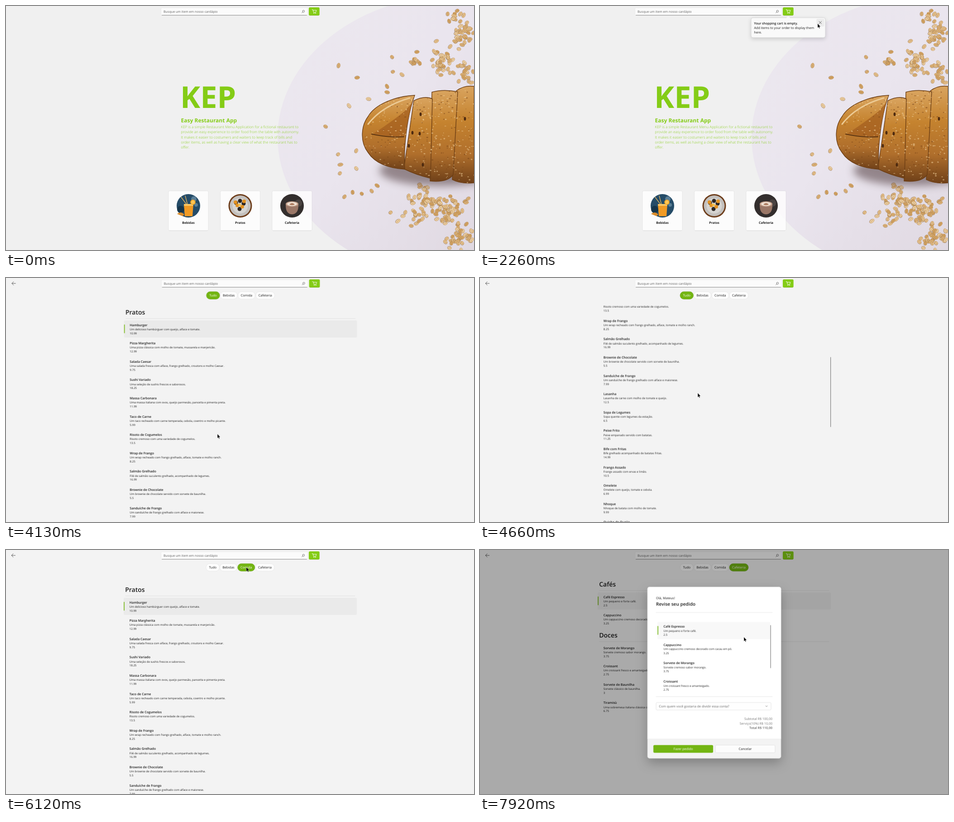
Recreate the animation shown at these times as an HTML page. Size 1034 px wide and 541 px high, loop 7.99 s.

```html
<!DOCTYPE html>
<html lang="pt">
<head>
<meta charset="utf-8">
<title>Menu</title>
<style>
  html, body { margin: 0; width: 100%; height: 100%; overflow: hidden; background: #f0f0f0; }
  svg { display: block; width: 1034px; height: 541px; }
  text { font-family: "Open Sans", "Noto Sans", sans-serif; font-size: 7.14px; fill: #1b1b1b; text-rendering: geometricPrecision; white-space: pre; }
  .name { font-weight: 600; font-size: 7.05px; }
  .small { font-size: 6.1px; }
  .head { font-weight: 600; font-size: 14px; }
  .brand { font-weight: 700; font-size: 66.5px; fill: #84cc16; }
  .title { font-weight: 700; font-size: 12.04px; fill: #84cc16; }
  .para { font-weight: 300; font-size: 8.11px; fill: #84cc16; }
  .label { font-weight: 700; font-size: 6.95px; }
  .mid { text-anchor: middle; }
  .end { text-anchor: end; }
  .line { fill: none; stroke-linecap: round; stroke-linejoin: round; }
  #tip { transform-origin: 681px 23px; }
  #dialog { transform-origin: 517px 272px; }
</style>
</head>
<body>
<svg id="stage" viewBox="0 0 1034 541"></svg>
<script>
const DUR = 7990, GREEN = '#84cc16', DEEP = '#73b512';
const EASE = 'cubic-bezier(.1,.9,.2,1)', PITCH = 40.6;

// Drawing helpers
const text = (x, y, s, cls = '', fill = '') =>
  `<text x="${x}" y="${y}" class="${cls}"${fill && ` style="fill:${fill}"`}>${s}</text>`;
const rect = (x, y, w, h, fill, r = 0, more = '') =>
  `<rect x="${x}" y="${y}" width="${w}" height="${h}" rx="${r}" fill="${fill}" ${more}/>`;
const circle = (x, y, r, fill, more = '') => `<circle cx="${x}" cy="${y}" r="${r}" fill="${fill}" ${more}/>`;
const path = (d, fill, more = '') => `<path d="${d}" fill="${fill}" ${more}/>`;
const stroke = (d, color, w = .8) => `<path class="line" d="${d}" stroke="${color}" stroke-width="${w}"/>`;
const group = (id, body, more = '') => `<g id="${id}" ${more}>${body}</g>`;

let seed = 7;
const rand = () => {
  seed = (seed * 1664525 + 1013904223) % 4294967296;
  return seed / 4294967296;
};
const spread = () => rand() + rand() + rand() - 1.5;

// Timeline helpers: stops are [ms, declarations, easing to the next stop]
let css = '';
const tracks = {};
function anim(id, stops) {
  const list = tracks[id] = tracks[id] || [];
  const name = `${id}-${list.length}`;
  const all = [[0, stops[0][1]], ...stops, [DUR, stops[stops.length - 1][1]]];
  css += `@keyframes ${name}{` + all.map(([ms, decl, ease]) =>
    `${(ms / DUR * 100).toFixed(3)}%{${decl};animation-timing-function:${ease || 'linear'}}`).join('') + '}';
  list.push(`${name} ${DUR}ms linear infinite`);
}
function show(id, from, to = DUR, fadeIn = 1, fadeOut = 1) {
  const stops = from > 0 ? [[from, 'opacity:0'], [from + fadeIn, 'opacity:1']] : [[0, 'opacity:1']];
  if (to < DUR) stops.push([to, 'opacity:1'], [to + fadeOut, 'opacity:0']);
  anim(id, stops);
}
const move = (id, points) =>
  anim(id, points.map(([ms, x, y, ease]) => [ms, `transform:translate(${x}px,${y}px)`, ease]));
const zoom = (id, points) => anim(id, points.map(([ms, k, ease]) => [ms, `transform:scale(${k})`, ease]));

// Top bar
const HINT = 'Busque um item em nosso cardápio';
const lens = color => circle(657.3, 11.6, 2.2, 'none', `stroke="${color}" stroke-width=".8"`) +
  stroke('M655.7 13.3l-2 2', color);
const cartIcon = stroke('M676.2 8h1.7l1.7 6h4.9l1.3-4.6h-7.3', '#fff', .9) +
  circle(680.4, 16, .9, '#fff') + circle(684, 16, .9, '#fff');
const topBar = rect(342.5, 4, 324, 16.8, '#fbfbfb', 2.5, 'stroke="#e3e3e3" stroke-width=".5"') +
  stroke('M344.5 20.4H664.5', '#808080', .9) + text(348, 14.6, HINT, '', '#606060') + lens('#555') +
  rect(669, 3, 23.7, 18, GREEN, 2.5) + stroke('M671 20.7H690.5', '#6a9f1c', .6) + cartIcon;
const focusBar = rect(342.5, 4, 324, 16.8, '#fff', 2.5, 'stroke="#e3e3e3" stroke-width=".5"') +
  stroke('M344 20.1H665', DEEP, 1.3) + text(348, 14.6, HINT, '', '#8c8c8c') + lens('#666') +
  stroke('M348.4 7.3V16.6', '#222', .7);

// Loaf and oat flakes
const FLAKES = ['#e6c492', '#dcb47c', '#edd2a8', '#d3a566'];
function flake(x, y) {
  const a = rand() * 180, r = 4 + rand() * 2;
  const at = `transform="translate(${x.toFixed(1)} ${y.toFixed(1)}) rotate(${a.toFixed(0)})"`;
  return `<g ${at}><ellipse cx=".8" cy="1.2" rx="${r.toFixed(1)}" ry="3.6" fill="#97816f" opacity=".4"/>` +
    `<ellipse rx="${r.toFixed(1)}" ry="3.4" fill="${FLAKES[rand() * 4 | 0]}" stroke="#b88545" stroke-width=".6"/>` +
    stroke('M-3 0Q0 1 3 -.3', '#a97638', .6) + '</g>';
}
const heaps = [
  [1010, 55, 24, 42, 36], [965, 125, 26, 24, 34], [1012, 146, 22, 20, 22], [905, 123, 14, 10, 9], [990, 24, 12, 12, 7],
  [925, 425, 34, 30, 34], [978, 452, 38, 34, 62], [1000, 512, 34, 26, 38], [905, 475, 34, 30, 14]
];
const loose = [
  [735, 132], [776, 159], [801, 206], [706, 267], [734, 329], [774, 321], [739, 352], [774, 360], [738, 371],
  [786, 416], [766, 413], [748, 423], [853, 113], [855, 146], [875, 152], [842, 178], [908, 102], [951, 78],
  [808, 410], [850, 458], [866, 477], [758, 221], [820, 398], [842, 191]
];
const scatter = heaps.map(([x, y, w, h, n]) =>
  Array.from({ length: n }, () => flake(x + spread() * w, y + spread() * h)).join('')).join('') +
  loose.map(([x, y]) => flake(x, y)).join('');

const slices = [
  'M995 188Q1012 175 1034 178V392Q1005 395 986 385Z',
  'M941 191Q965 184 998 190L988 374Q975 392 937 388Z',
  'M901 210Q925 198 942 206L938 382Q905 374 879 361Z',
  'M903 198C860 200 815 218 800 245C785 265 781 300 800 325C815 348 845 360 881 362C878 310 887 240 903 198Z'
];
const crumbs = Array.from({ length: 520 }, () => {
  const x = 785 + rand() * 250, y = 180 + rand() * 212, dark = rand() < .35;
  return `<ellipse cx="${x.toFixed(1)}" cy="${y.toFixed(1)}" rx="${(.7 + rand() * 1.7).toFixed(1)}" ry="${(.6 + rand()).toFixed(1)}" ` +
    `fill="${dark ? '#744116' : '#f0cf9c'}" opacity="${dark ? .5 : .55}"/>`;
}).join('');
const loaf = `<ellipse cx="960" cy="365" rx="135" ry="34" fill="#4f3a3c" opacity=".55" filter="url(#soft)"/>` +
  slices.map(d => path(d, 'url(#crust)', 'stroke="#6b3d14" stroke-width="1.4"')).join('') +
  path('M812 283Q850 258 880 234L897 215Q886 265 880 290Q845 290 812 283Z', '#a55f1f', 'opacity=".75"') +
  stroke('M808 284Q845 292 879 290', '#5a3210', 2) + stroke('M800 262Q830 222 892 204', '#ecca94', 3) +
  `<g clip-path="url(#bread)">${crumbs}</g>` +
  [[916, 240], [898, 281], [914, 283], [890, 310], [921, 352], [1014, 250]].map(([x, y]) =>
    `<ellipse cx="${x}" cy="${y}" rx="2.4" ry="4" fill="#4d2a10"/>`).join('');
const photo = `<g clip-path="url(#oval)">${rect(590, 0, 444, 541, 'url(#cloth)')}${scatter}${loaf}</g>`;

// Category cards
const juice = circle(403, 443, 26, '#254c68') + circle(415, 428, 6, '#7fa0b5', 'opacity=".6"') +
  circle(420, 441, 4, '#8db0c2', 'opacity=".5"') + circle(386, 451, 8, '#16354a') +
  stroke('M387 424L399 440M396 421L401 440', '#e9b65c', 1.3) +
  path('M393 439H414L412 466H395Z', '#f09a24') + rect(393, 439, 21, 4, '#f9c766', 1.5) +
  circle(413, 435, 5.8, '#f6a51f') + circle(413, 435, 4, '#ffc557') +
  path('M378 461Q386 454 394 462L390 466Z', '#d98b2a');
const plate = circle(517.5, 443, 26, '#6d3d1b') + circle(517.5, 443, 23, '#c3c0bd') + circle(517.5, 443, 17, '#d6d4d1') +
  [[508, 436], [525, 438], [516, 450], [517, 432]].map(([x, y]) => circle(x, y, 4.5, '#2b2522')).join('') +
  [[511, 442], [522, 445], [526, 433], [507, 435]].map(([x, y]) => circle(x, y, 4, '#e39222')).join('') +
  circle(516, 441, 3, '#f3c04e');
const coffee = circle(632, 443, 26, '#332e2d') + circle(646, 437, 8, '#4a4341') +
  path('M618 439H646Q647 461 632 462Q617 461 618 439Z', '#9a7767') +
  `<ellipse cx="632" cy="439" rx="14" ry="6" fill="#c4a08b"/><ellipse cx="632" cy="439" rx="11" ry="4.2" fill="#efe0d2"/>` +
  path('M626 440Q632 434 638 440Q632 443 626 440Z', '#a9765a');
const card = (x, pic, label) =>
  rect(x - 44, 410, 88, 88, '#fff', 2.5, 'fill-opacity=".78" stroke="#000" stroke-opacity=".09" stroke-width=".7"') +
  stroke(`M${x - 42} 498H${x + 42}`, '#d4d4d4', .6) + pic + text(x, 482.5, label, 'label mid');

const intro = [
  'KEP is a simple Restaurant Menu Application for a fictional restaurant to',
  'provide an easy experience to order food from the table with autonomy.',
  'It makes it easier to costumers and waiters to keep track of bills and',
  'order items, as well as having a clear view of what the restaurant has to',
  'offer.'
];
const home = photo + topBar + group('focus', focusBar) + text(385, 226, 'KEP', 'brand') +
  text(386.5, 257.6, 'Easy Restaurant App', 'title') +
  intro.map((s, i) => text(386.5, 270.6 + i * 11.45, s, 'para')).join('') +
  card(403, juice, 'Bebidas') + card(517.5, plate, 'Pratos') + card(632, coffee, 'Cafeteria');

const tip = rect(599, 26, 164, 44, '#f9f9f9', 4, 'stroke="#c9c9c9" stroke-width=".7" filter="url(#drop)"') +
  path('M676 26.4L681 22L686 26.4Z', '#f9f9f9', 'stroke="#d5d5d5" stroke-width=".4"') +
  rect(677, 26, 8, 1.2, '#f9f9f9') + group('close', rect(743.5, 28.5, 17, 17, '#ececec', 2)) +
  stroke('M749 34L754.6 39.4M754.6 34L749 39.4', '#333', .7) +
  text(605.6, 40.6, 'Your shopping cart is empty.', 'name') +
  text(605.6, 51, 'Add items to your order to display them') + text(605.6, 61, 'here.');

// Menu content
const dishes = [
  ['Hamburger', 'Um delicioso hambúrguer com queijo, alface e tomate.', '10.99'],
  ['Pizza Margherita', 'Uma pizza clássica com molho de tomate, mussarela e manjericão.', '12.99'],
  ['Salada Caesar', 'Uma salada fresca com alface, frango grelhado, croutons e molho Caesar.', '9.75'],
  ['Sushi Variado', 'Uma seleção de sushis frescos e saborosos.', '18.25'],
  ['Massa Carbonara', 'Uma massa italiana com ovos, queijo parmesão, pancetta e pimenta preta.', '11.99'],
  ['Taco de Carne', 'Um taco recheado com carne temperada, cebola, coentro e molho picante.', '5.99'],
  ['Risoto de Cogumelos', 'Risoto cremoso com uma variedade de cogumelos.', '13.5'],
  ['Wrap de Frango', 'Um wrap recheado com frango grelhado, alface, tomate e molho ranch.', '8.25'],
  ['Salmão Grelhado', 'Filé de salmão suculento grelhado, acompanhado de legumes.', '16.99'],
  ['Brownie de Chocolate', 'Um brownie de chocolate servido com sorvete de baunilha.', '5.5'],
  ['Sanduíche de Frango', 'Um sanduíche de frango grelhado com alface e maionese.', '7.99'],
  ['Lasanha', 'Lasanha de carne com molho de tomate e queijo.', '12.5'],
  ['Sopa de Legumes', 'Sopa quente com legumes da estação.', '6.5'],
  ['Peixe Frito', 'Peixe empanado servido com batatas.', '11.25'],
  ['Bife com Fritas', 'Bife grelhado acompanhado de batatas fritas.', '14.99'],
  ['Frango Assado', 'Frango assado com ervas e limão.', '10.5'],
  ['Omelete', 'Omelete com queijo, tomate e cebola.', '6.99'],
  ['Nhoque', 'Nhoque de batata com molho de tomate.', '9.99'],
  ['Quiche de Queijo', 'Uma torta salgada com queijo e ovos.', '7.25'],
  ['Camarão ao Alho', 'Camarão salteado no alho e azeite.', '17.5']
];
const softs = [
  ['Refrigerante', 'Uma bebida refrescante e gaseificada.', '2.25'],
  ['Água Mineral', 'Água mineral natural.', '1.75'],
  ['Chá Gelado', 'Chá preto gelado adoçado.', '3'],
  ['Suco de Laranja', 'Suco fresco e natural de laranja.', '3.5']
];
const coffees = [
  ['Café Espresso', 'Um pequeno e forte café.', '2.5'],
  ['Cappuccino', 'Um cappuccino cremoso decorado com cacau em pó.', '3.25']
];
const sweets = [
  ['Sorvete de Morango', 'Sorvete cremoso sabor morango.', '3.75'],
  ['Croissant', 'Um croissant fresco e amanteigado.', '2.75'],
  ['Sorvete de Baunilha', 'Sorvete clássico de baunilha.', '3'],
  ['Tiramisù', 'Uma sobremesa italiana clássica com camadas de biscoito, café e mascarpone.', '6.75']
];
const row = (x, y, [name, note, price]) => text(x, y + 2.5, name, 'name') +
  text(x, y + 11.8, note, 'small') + text(x, y + 20.5, price, 'small');
const picked = (x, y, w, fill) => rect(x, y - 10, w, 38, fill, 2.5) + rect(x + .2, y - 1, 1.6, 19.5, DEEP, .8);
function list(groups) {
  let y = 76, out = picked(260, 104, 515, '#eaeaea');
  for (const [title, items] of groups) {
    out += text(263.2, y + 5, title, 'head') + stroke(`M264 ${y + 14}H771`, '#d9d9d9', .7);
    items.forEach((item, i) => {
      const at = y + 28 + i * PITCH;
      if (item === softs[3] && groups.length > 2) out += group('hover', rect(260, at - 10, 515, 38, '#eaeaea', 2.5));
      out += row(272.8, at, item);
    });
    y += items.length ? 72.4 + (items.length - 1) * PITCH : 32;
  }
  return out;
}
const pills = [['Tudo', 442, 29.5], ['Bebidas', 472.5, 38], ['Comida', 511.8, 38], ['Cafeteria', 551, 42]];
const pill = ([name, x, w], on) =>
  rect(x, 30.2, w, 16.8, on ? DEEP : '#fdfdfd', 8.4, on ? 'stroke="#5f980c" stroke-width=".5"' : 'stroke="#dfdfdf" stroke-width=".6"') +
  text(x + w / 2, 41.2, name, 'mid', on ? '#fff' : '');
const filters = pills.map(p => pill(p)).join('') + group('fading', text(530.8, 41.2, 'Comida', 'mid', '#3d6b05')) +
  pills.map((p, i) => group('pill' + i, pill(p, true))).join('');

const menu = topBar + stroke('M12.3 12H20.5M16 8.2L12.2 12L16 15.8', '#333', .8) + filters +
  '<g clip-path="url(#view)">' +
  group('all', group('scroll', list([['Pratos', dishes], ['Bebidas', []], ['Softs', softs], ['Cafés', coffees], ['Doces', sweets]]))) +
  group('drinks', list([['Softs', softs]])) + group('food', list([['Pratos', dishes]])) +
  group('cafe', list([['Cafés', coffees], ['Doces', sweets]])) + '</g>' +
  group('bar', group('thumb', rect(774, 0, 1.3, 155, '#858585', .6)));

// Order dialog
const dialog = rect(370, 82, 295, 380, '#f3f3f3', 4.5, 'filter="url(#big)"') +
  path('M370 419V86.5Q370 82 374.5 82H660.5Q665 82 665 86.5V419Z', '#fff') + stroke('M370 419H665', '#e5e5e5', .6) +
  text(389, 109.6, 'Olá, Mateus!') + text(389, 123.8, 'Revise seu pedido', 'name" style="font-size:10.1px') +
  stroke('M389 138.5H646M389 325H646', '#dedede', .7) + picked(392, 169.5, 249, '#f8f8f8') +
  [...coffees, sweets[0], sweets[1]].map((item, i) => row(405.4, 169.5 + i * PITCH, item)).join('') +
  rect(641.4, 166.5, 1.3, 95.5, '#858585', .6) +
  rect(389, 338, 254, 16.8, '#fefefe', 2.5, 'stroke="#dcdcdc" stroke-width=".7"') +
  text(395.4, 348.8, 'Com quem você gostaria de dividir essa conta?', '', '#666') +
  stroke('M631 345.4L633 347.4L635 345.4', '#555', .7) +
  text(646, 376.6, 'Subtotal R$ 100,00', 'end', '#777') + text(646, 386.8, 'Serviço(10%) R$ 10,00', 'end', '#777') +
  text(646, 397, 'Total R$ 110,00', 'end name', '#666') +
  rect(383, 432.5, 132, 17, DEEP, 2.5) + text(449, 443.6, 'Fazer pedido', 'mid', '#fff') +
  rect(520, 432.5, 132, 17, '#fcfcfc', 2.5, 'stroke="#dcdcdc" stroke-width=".7"') + text(586, 443.6, 'Cancelar', 'mid');

const defs = `<defs>
  <clipPath id="oval"><ellipse cx="1000" cy="291" rx="400" ry="316"/></clipPath>
  <clipPath id="view"><rect y="61" width="1034" height="480"/></clipPath>
  <clipPath id="bread">${slices.map(d => path(d, '#000')).join('')}</clipPath>
  <linearGradient id="cloth" x2="1" y2="1"><stop stop-color="#ece8ef"/><stop offset=".5" stop-color="#eae5ee"/><stop offset="1" stop-color="#e0d9e2"/></linearGradient>
  <linearGradient id="crust" x2="0" y2="1"><stop stop-color="#d9a45f"/><stop offset=".35" stop-color="#c5832f"/><stop offset=".7" stop-color="#b06f2c"/><stop offset="1" stop-color="#704119"/></linearGradient>
  <filter id="soft" x="-50%" y="-50%" width="200%" height="200%"><feGaussianBlur stdDeviation="9"/></filter>
  <filter id="drop" x="-20%" y="-30%" width="140%" height="180%"><feDropShadow dx="0" dy="3" stdDeviation="4" flood-opacity=".16"/></filter>
  <filter id="big" x="-20%" y="-20%" width="140%" height="140%"><feDropShadow dx="0" dy="10" stdDeviation="12" flood-opacity=".25"/></filter>
</defs>`;
document.getElementById('stage').innerHTML = defs + group('home', home) + group('tip', tip) +
  group('paper', rect(0, 0, 1034, 541, '#f3f3f3')) + group('menu', menu) +
  group('shade', rect(0, 0, 1034, 541, '#000', 0, 'fill-opacity=".3"')) + group('dialog', dialog) +
  group('cursor', path('M0 0V9.4L2.1 7.5L3.6 10.8L5 10.2L3.6 7H6.4Z', '#000', 'stroke="#fff" stroke-width=".4"'));

// Motion
show('home', 0, 3730, 1, 140);
show('focus', 2860);
show('tip', 1130, 2790, 60, 150);
zoom('tip', [[1130, .3, EASE], [1400, 1], [2790, 1, 'ease-in'], [2940, .6]]);
show('close', 1860, 2790);

show('paper', 3730, DUR, 140);
show('menu', 3870, DUR, 110);
move('menu', [[3870, 108, 0, EASE], [4225, 0, 0]]);
move('scroll', [[4300, 0, 0], [4460, 0, -100], [5260, 0, -869.8, 'ease-out'], [5400, 0, -897]]);
show('hover', 5150, 5480);
show('bar', 4380, 5600, 90);
move('thumb', [[4300, 0, 74], [4460, 0, 108], [5260, 0, 376, 'ease-out'], [5400, 0, 382]]);

const clicks = [0, 5600, 6010, 6470, DUR];
['all', 'drinks', 'food', 'cafe'].forEach((id, i) => {
  show(id, clicks[i], clicks[i + 1], 110);
  show('pill' + i, clicks[i], clicks[i + 1], 60, 60);
  if (i) move(id, [[clicks[i], 0, 60, EASE], [clicks[i] + 540, 0, 0]]);
});
show('fading', 6470, 6840, 1, 80);

show('shade', 7390, DUR, 170);
show('dialog', 7390, DUR, 130);
zoom('dialog', [[7390, 1.05, EASE], [7650, 1]]);

show('cursor', 459);
move('cursor', [
  [460, 880, 391, 'ease-out'], [960, 681, 11], [1330, 681, 11, 'ease-in-out'], [1930, 745.5, 44],
  [2060, 745.5, 44], [2250, 746, 39], [3135, 746, 39], [3200, 706, 81, 'ease-out'], [3530, 494, 458],
  [3860, 494, 458, 'ease-out'], [4130, 467, 346], [4460, 478, 270], [5250, 490, 211], [5330, 490, 211, 'ease-in-out'],
  [5560, 491, 37], [5700, 491, 37, 'ease-in-out'], [5960, 531, 38], [6180, 531, 38, 'ease-in-out'],
  [6420, 572, 37], [6600, 572, 37, 'ease-in'], [6790, 612, 24], [6920, 652, 15, 'ease-out'], [7110, 681, 10],
  [7400, 681, 10, 'ease-in-out'], [7910, 583, 193]
]);

for (const id in tracks) css += `#${id}{animation:${tracks[id].join(',')}}`;
document.head.appendChild(document.createElement('style')).textContent = css;
</script>
</body>
</html>
```
